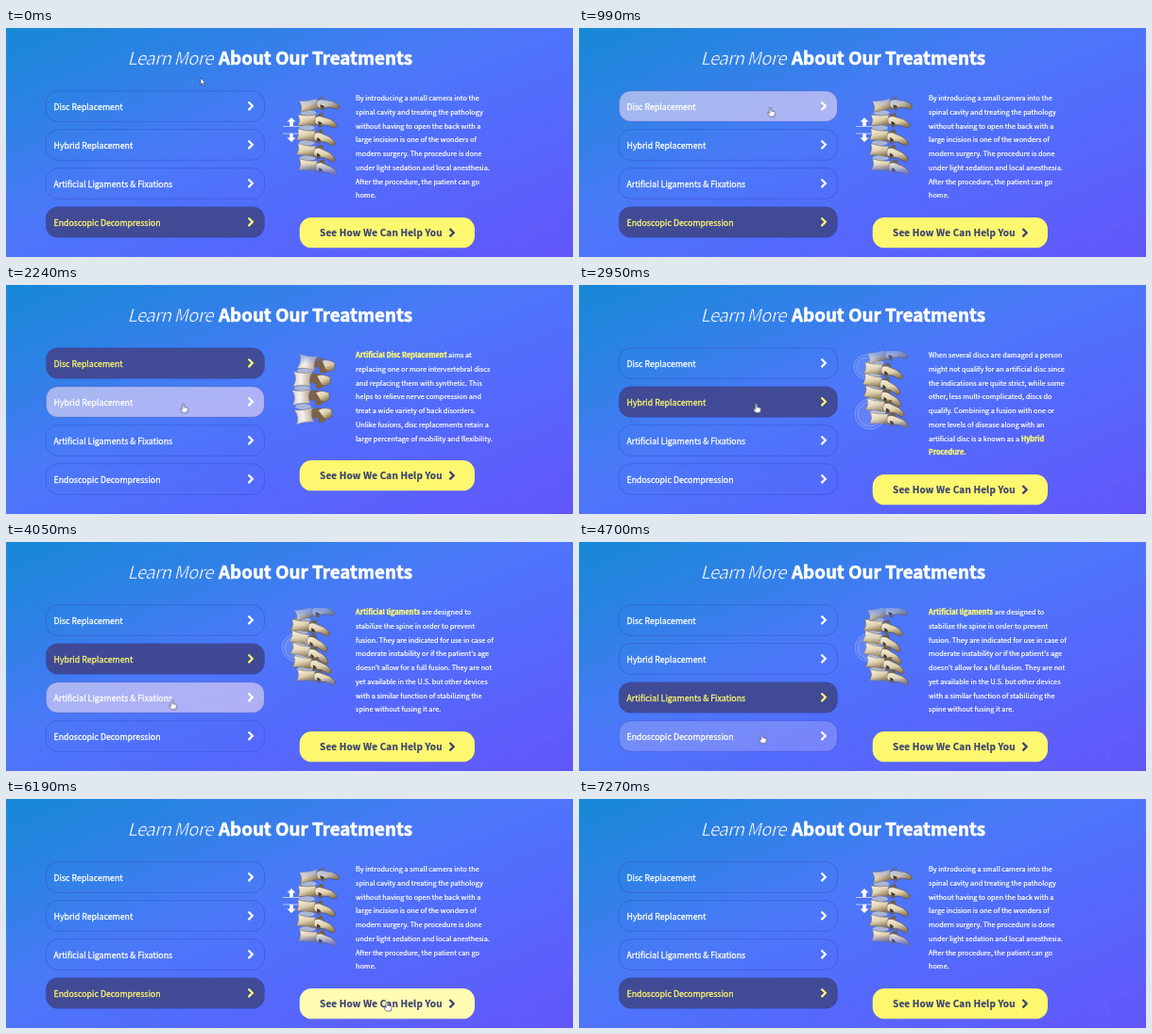
An HTML page for the animation above (7.57 s loop, 600 by 243 pixels).

```html
<!DOCTYPE html>
<html lang="en">
<head>
<meta charset="utf-8">
<title>Treatments</title>
<style>
  html, body { margin: 0; width: 100%; height: 100%; overflow: hidden; }
  body { background: linear-gradient(158deg, #1689d6 0%, #2c82e4 20%, #4a79f8 42%, #536bfc 64%, #5c5ffb 84%, #6256f8 100%); }
  svg { display: block; width: 600px; height: 243px; }
  text { font-family: "Noto Sans CJK JP", "Noto Sans CJK SC", "Noto Sans CJK", "Open Sans", sans-serif; white-space: pre; }
  .light { font-size: 18.8px; font-weight: 300; font-style: italic; letter-spacing: -.75px; fill: #fff; stroke: #3a80ee; stroke-width: .45; }
  .heading { font-size: 18.8px; font-weight: 700; fill: #fff; stroke: #fff; stroke-width: .6; }
  .label { font-size: 8.8px; font-weight: 500; stroke-width: .28; }
  .copy { font-size: 7.32px; font-weight: 500; fill: #fff; stroke: #fff; stroke-width: .24; }
  .strong { font-weight: 700; fill: #fdf870; stroke: #fdf870; stroke-width: .35; }
  .cta { font-size: 10px; font-weight: 700; letter-spacing: .15px; fill: #3a4070; stroke: #3a4070; stroke-width: .2; }
  .chevron { fill: none; stroke-width: 2.2; }
  .box { stroke: #3446b8; stroke-opacity: .5; stroke-width: .8; }
</style>
</head>
<body>
<svg id="stage" viewBox="0 0 600 243">
  <defs>
    <linearGradient id="ivory" x1="0" y1="0" x2=".6" y2="1">
      <stop offset="0" stop-color="#fbf4e2"/>
      <stop offset=".55" stop-color="#e0d2b0"/>
      <stop offset="1" stop-color="#8f7a58"/>
    </linearGradient>
    <linearGradient id="pale" x1="0" y1="0" x2="1" y2="0">
      <stop offset="0" stop-color="#d5d0d4"/>
      <stop offset=".4" stop-color="#f6f1ec"/>
      <stop offset="1" stop-color="#b3a08a"/>
    </linearGradient>
    <linearGradient id="fade" x1="0" y1="0" x2="0" y2="1">
      <stop offset="0" stop-color="#fff" stop-opacity=".3"/>
      <stop offset=".16" stop-color="#fff"/>
      <stop offset=".84" stop-color="#fff"/>
      <stop offset="1" stop-color="#fff" stop-opacity=".15"/>
    </linearGradient>
    <mask id="soft" maskUnits="userSpaceOnUse" x="285" y="70" width="72" height="88">
      <rect x="285" y="70" width="72" height="88" fill="url(#fade)"/>
    </mask>
    <g id="bone">
      <path d="M9-2Q12-9 16-8Q18-3 17 3Q15 9 12 7z" fill="#6f604c"/>
      <path d="M7-3Q13-6 18-3Q25-2 30 3Q33 7 28 8Q21 4 16 5Q11 5 7 3z" fill="url(#ivory)" stroke="#574a3c" stroke-width=".6"/>
      <path d="M-10-6Q0-4 9-6Q7 0 9 5.500Q0 4-10 6Q-7 0-10-6z" fill="url(#ivory)" stroke="#7d6d50" stroke-width=".5"/>
      <path d="M11 1Q14 1 16 4L12 5z" fill="#40382f"/>
    </g>
    <g id="spool">
      <path d="M8-5Q16-9 20-4L24 5Q20 11 14 9Q15 2 8 4z" fill="#7b6248"/>
      <path d="M15-4Q21-7 29-3V3Q26 8 20 5z" fill="url(#ivory)" stroke="#6b5640" stroke-width=".5"/>
      <path d="M-10-8Q0-5 10-8Q5 0 9 7.500Q0 5-10 8Q-5 0-10-8z" fill="url(#pale)" stroke="#8b7d70" stroke-width=".5"/>
    </g>
  </defs>
  <path d="M537 236L556 214L580 205L600 182M556 214L566 243M580 205L592 235" fill="none" stroke="#fff" stroke-opacity=".04"/>
  <text class="light" x="128.500" y="39">Learn More</text>
  <text class="heading" x="225" y="39">About Our Treatments</text>
</svg>
<script>
const LOOP = 7570;
const stage = document.getElementById('stage');
const CLEAR = 'rgba(65,74,149,0)', HOVER = 'rgba(240,220,245,.6)', DARK = '#414a95';
const WHITE = '#ffffff', YELLOW = '#fdf870', PALE = '#fffcb4';

function add(markup, parent = stage) {
  parent.insertAdjacentHTML('beforeend', markup);
  return parent.lastElementChild;
}

// steps: [ms, value] pairs, the first at 0; the last value holds to the end of the loop
function play(el, prop, steps, easing = 'linear') {
  const frames = [...steps, [LOOP, steps.at(-1)[1]]]
    .map(([ms, value]) => ({ offset: ms / LOOP, [prop]: value, easing }));
  el.animate(frames, { duration: LOOP, iterations: Infinity });
}

// discs between neighbours, then one bone at each [x, y, turn]
function spine(places, shape = 'bone') {
  const discs = places.slice(1).map(([x, y], i) => {
    const [px, py] = places[i];
    return `<ellipse cx="${(x + px) / 2}" cy="${(y + py) / 2}" rx="8.500" ry="3" fill="#a9b6d6"/>`;
  });
  const bones = places.map(([x, y, turn]) =>
    `<use href="#${shape}" transform="translate(${x} ${y}) rotate(${turn})"/>`);
  return `<g mask="url(#soft)">${discs.join('')}${bones.join('')}</g>`;
}

const ring = (x, y, r) =>
  `<g fill="#fff" fill-opacity=".06" stroke="#dfe6ff" stroke-opacity=".45" stroke-width=".7">
    <circle cx="${x}" cy="${y}" r="${r}"/><circle cx="${x}" cy="${y}" r="${r - 3}"/></g>`;

const closeUp = [[319, 82, 8], [314, 100, 2], [313, 119, -3], [316, 139, -8]];
const curve = [[316, 76, -12], [312, 89, 6], [311, 102, 14], [312, 115, 14], [314, 128, 8], [318, 142, 4]];
const column = [[321, 82, -8], [319, 98, 0], [318, 114, 6], [318, 130, 8], [320, 146, 6]];
const arrows = `<path d="M293 104.500H311M293 112H311" stroke="#fff" stroke-opacity=".75" stroke-width=".8"/>
  <path d="M302 95L306.500 99.500H303.800V104H300.200V99.500H297.500z
           M302 121L306.500 116.500H303.800V112H300.200V116.500H297.500z" fill="#fff"/>`;

const panels = [
  { label: 'Disc Replacement',
    fill: [[0, CLEAR], [680, CLEAR], [980, HOVER], [1170, HOVER], [1470, DARK], [2650, DARK], [2950, CLEAR]],
    ink: [[0, WHITE], [1170, WHITE], [1470, YELLOW], [2650, YELLOW], [2950, WHITE]],
    show: [[0, 0], [1150, 1], [2620, 0]],
    art: spine(closeUp, 'spool'),
    copy: ['*Artificial Disc Replacement* aims at', 'replacing one or more intervertebral discs',
      'and replacing them with synthetic. This', 'helps to relieve nerve compression and',
      'treat a wide variety of back disorders.', 'Unlike fusions, disc replacements retain a',
      'large percentage of mobility and flexibility.'] },
  { label: 'Hybrid Replacement',
    fill: [[0, CLEAR], [1950, CLEAR], [2240, HOVER], [2650, HOVER], [2950, DARK], [4050, DARK], [4340, CLEAR]],
    ink: [[0, WHITE], [2650, WHITE], [2950, YELLOW], [4050, YELLOW], [4340, WHITE]],
    show: [[0, 0], [2620, 1], [4020, 0]],
    art: spine(curve) + ring(304, 87, 13) + ring(308, 137, 16),
    copy: ['When several discs are damaged a person', 'might not qualify for an artificial disc since',
      'the indications are quite strict, while some', 'other, less multi-complicated, discs do',
      'qualify. Combining a fusion with one or', 'more levels of disease along with an',
      'artificial disc is a known as a *Hybrid*', '*Procedure.*'] },
  { label: 'Artificial Ligaments &amp; Fixations',
    fill: [[0, CLEAR], [3430, CLEAR], [3680, HOVER], [4050, HOVER], [4340, DARK], [5340, DARK], [5600, CLEAR]],
    ink: [[0, WHITE], [4050, WHITE], [4340, YELLOW], [5340, YELLOW], [5600, WHITE]],
    show: [[0, 0], [4020, 1], [5330, 0]],
    art: spine(curve) + ring(307, 112, 15),
    copy: ['*Artificial ligaments* are designed to', 'stabilize the spine in order to prevent',
      'fusion. They are indicated for use in case of', 'moderate instability or if the patient’s age',
      'doesn’t allow for a full fusion. They are not', 'yet available in the U.S. but other devices',
      'with a similar function of stabilizing the', 'spine without fusing it are.'] },
  { label: 'Endoscopic Decompression',
    fill: [[0, DARK], [1170, DARK], [1470, CLEAR], [4590, CLEAR], [4880, HOVER], [5340, HOVER], [5640, DARK]],
    ink: [[0, YELLOW], [1170, YELLOW], [1470, WHITE], [5340, WHITE], [5640, YELLOW]],
    show: [[0, 1], [1150, 0], [5330, 1]],
    art: spine(column) + arrows,
    copy: ['By introducing a small camera into the', 'spinal cavity and treating the pathology',
      'without having to open the back with a', 'large incision is one of the wonders of',
      'modern surgery. The procedure is done', 'under light sedation and local anesthesia.',
      'After the procedure, the patient can go', 'home.'] }
];

panels.forEach(({ label, fill, ink, show, art, copy }, i) => {
  const y = 66.7 + i * 41;
  const box = add(`<rect class="box" x="42.300" y="${y}" width="231.200" height="32.600" rx="12.500"/>`);
  const text = add(`<text class="label" x="50.500" y="${y + 19.8}">${label}</text>`);
  const chevron = add(`<path class="chevron" d="M256.500 ${y + 11.8}l4.300 4.300l-4.300 4.300"/>`);
  play(box, 'fill', fill);
  play(text, 'fill', ink);
  play(text, 'stroke', ink);
  play(chevron, 'stroke', ink);

  const lines = copy.map((line, n) =>
    `<text class="copy" x="370" y="${(77 + n * 14.75).toFixed(2)}">${line.replace(/\*(.+?)\*/g, '<tspan class="strong">$1</tspan>')}</text>`);
  play(add(`<g>${art}${lines.join('')}</g>`), 'opacity', show, 'step-end');
});

const cta = add(`<g><rect x="310.700" y="201" width="185.300" height="32.300" rx="12.500"/>
  <text class="cta" x="332" y="220.800">See How We Can Help You</text>
  <path class="chevron" d="M469.500 213l4.200 4.200l-4.200 4.200" stroke="#3a4070"/></g>`);
play(cta, 'transform', [[0, 'translate(0px,0px)'], [1150, 'translate(0px,-15px)'], [2620, 'translate(0px,0px)']], 'step-end');
play(cta.firstElementChild, 'fill', [[0, YELLOW], [5900, YELLOW], [6190, PALE], [6960, PALE], [7270, YELLOW]]);

const cursor = add('<g stroke="#2b3050" stroke-width=".6" fill="#fff" stroke-linejoin="round"></g>');
const arrow = add('<path d="M0 0V7L1.600 5.600L2.700 8.200L3.900 7.700L2.800 5.200H4.900z"/>', cursor);
const hand = add('<path d="M-.9.800Q0-.6.900.800V4L4.200 4.700Q5.200 5 5 6.400L4.300 10H-.6L-3 6.800Q-3.200 5.600-1.900 5.800L-.9 6.800z"/>', cursor);

const track = [[0, 206, 53], [440, 206, 53], [900, 202.5, 84], [1780, 202.5, 84], [2080, 187.5, 125.5],
  [3320, 187.5, 125.5], [3600, 175.5, 167.5], [4530, 175.5, 167.5], [4690, 193.5, 203.5],
  [5670, 193.5, 203.5], [6010, 403, 215], [6750, 403, 215], [7230, 547, 248]];
play(cursor, 'transform', track.map(([ms, x, y]) => [ms, `translate(${x}px,${y}px)`]), 'ease-in-out');

// moments at which the pointer enters or leaves a button
const crossings = [660, 1900, 1945, 3420, 3475, 4595, 4625, 5810, 5850, 7010];
const toggles = first => [0, ...crossings].map((ms, i) => [ms, (i + first) % 2]);
play(arrow, 'opacity', toggles(1), 'step-end');
play(hand, 'opacity', toggles(0), 'step-end');
</script>
</body>
</html>
```
